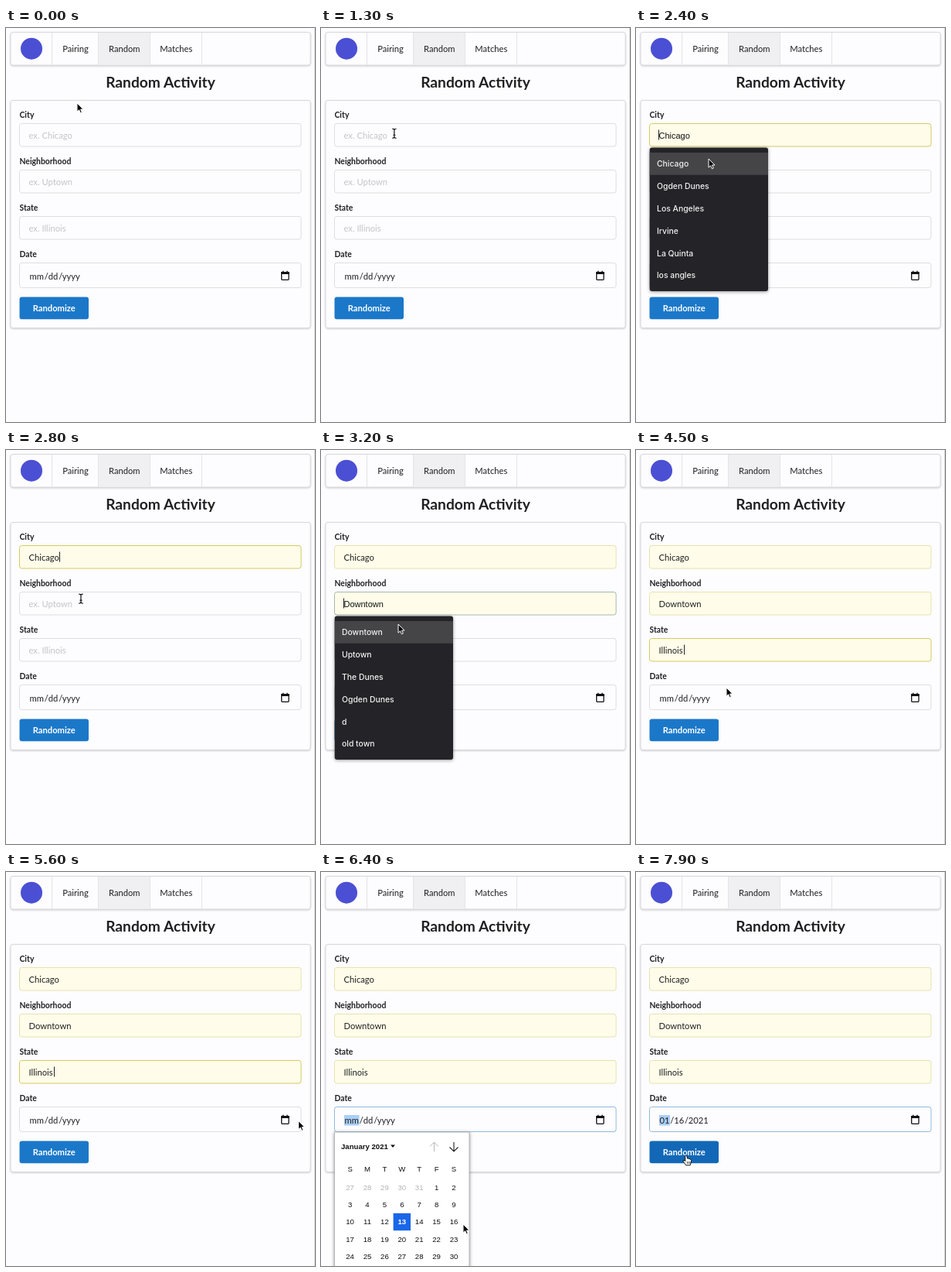
These frames come from a looping animation (400 by 509 pixels, 8 s). An HTML page:

```html
<!DOCTYPE html>
<html lang="en">
<head>
<meta charset="utf-8">
<title>Random Activity</title>
<style>
  html, body { margin: 0; width: 100%; height: 100%; overflow: hidden; background: #fdfcfe; }
  svg { display: block; font: 11.2px Lato, sans-serif; }
  text { fill: #202021; white-space: pre; }
  .title { font-size: 19.2px; font-weight: 700; }
  .label { font-size: 10.4px; font-weight: 700; }
  .button { font-weight: 700; fill: #fff; }
  .preview { font: 11px "Liberation Sans", Arial, sans-serif; fill: #111; }
  .option { font: 500 10.4px Inter, sans-serif; fill: #f1f1f2; }
  .day { font: 9.6px "Liberation Sans", Arial, sans-serif; fill: #111; }
  .bold { font-weight: 700; }
  .panel { fill: #fdfcfe; stroke: #d8d7da; filter: drop-shadow(0 1px 1px #2223); }
  .popup { filter: drop-shadow(0 1px 2px #0006); }
</style>
</head>
<body>
<svg id="stage" width="400" height="509" viewBox="0 0 400 509"></svg>
<script>
const LOOP = 8000;
const FIELDS = [
  { label: 'City', hint: 'ex. Chicago', value: 'Chicago', y: 123, caretEnd: 69.5,
    open: 1900, hover: 2150, pick: 2600, blur: 3000,
    options: ['Chicago', 'Ogden Dunes', 'Los Angeles', 'Irvine', 'La Quinta', 'los angles'] },
  { label: 'Neighborhood', hint: 'ex. Uptown', value: 'Downtown', y: 183, caretEnd: 84.5,
    open: 2950, hover: 3100, pick: 3500, blur: 4050,
    options: ['Downtown', 'Uptown', 'The Dunes', 'Ogden Dunes', 'd', 'old town'] },
  { label: 'State', hint: 'ex. Illinois', value: 'Illinois', y: 243, caretEnd: 62.5,
    open: 3850, hover: 4150, pick: 4400, blur: 5750,
    options: ['Illinois', 'California', 'Indiana', 'IN', 'CA', 'New York'] },
];
const DATE = { open: 5750, pick: 6750, close: 6900 };

// Pointer path: time, x, y
const PATH = [
  [0, 92, 97], [600, 92, 97], [1400, 95, 138], [1800, 95, 139], [2300, 94, 169], [2600, 94, 169],
  [2900, 98, 200], [3080, 100, 224], [3200, 100, 225], [3500, 100, 228], [3800, 107, 259],
  [4000, 108, 260], [4150, 110, 284], [4350, 112, 294], [4500, 117, 307], [5000, 122, 317],
  [5200, 122, 317], [5550, 385, 322], [5700, 361, 320], [6000, 361, 320], [6400, 184, 455],
  [6650, 173, 451], [6950, 173, 451], [7700, 67, 368], [7900, 65, 368], [8000, 65, 368],
];

const text = (x, y, s, cls = '', extra = '') => `<text x="${x}" y="${y}" class="${cls}" ${extra}>${s}</text>`;
const centered = (x, y, s, cls, extra = '') => text(x, y, s, cls, `text-anchor="middle" ${extra}`);
const rect = (x, y, w, h, fill, extra = '') =>
  `<rect x="${x}" y="${y}" width="${w}" height="${h}" fill="${fill}" ${extra}/>`;
const path = (d, extra) => `<path d="${d}" ${extra}/>`;
const input = (y, h, fill, stroke) => rect(17.5, y + .5, 364.5, h, fill, `rx="3" stroke="${stroke}"`);

function pointerAt(t) {
  const i = PATH.findIndex(key => key[0] > t);
  const [t0, x0, y0] = PATH[i - 1], [t1, x1, y1] = PATH[i];
  const u = (t - t0) / (t1 - t0), e = u * u * (3 - 2 * u);
  return { x: x0 + (x1 - x0) * e, y: y0 + (y1 - y0) * e };
}

const header = [
  rect(6, 5.5, 388, 42.5, '', 'rx="3" class="panel"'),
  rect(120, 6, 66.5, 41.5, '#f0eff1'),
  path('M59.5 6V48M119.5 6V48M186.5 6V48M253.5 6V48', 'stroke="#e4e3e6"'),
  '<circle cx="33" cy="26.7" r="14" fill="#4b4fd3"/>',
  centered(90, 31, 'Pairing'), centered(153.3, 31, 'Random'), centered(220.3, 31, 'Matches'),
  centered(200, 76.5, 'Random Activity', 'title'),
  rect(6, 93.5, 388, 294, '', 'rx="3" class="panel"'),
  rect(399, 0, 1, 509, '#d0cfd2'),
].join('');

function drawField(f, t) {
  const focused = t >= f.open && t < f.blur;
  const filled = t >= f.hover, picked = t >= f.pick;
  let border = filled ? '#e6e2b0' : '#dedde0';
  if (focused && filled) border = t < f.hover + 200 ? '#a2b8ad' : '#d5c965';
  else if (focused) border = t < f.open + 200 ? '#b9c3cc' : '#85b7d9';
  const y = f.y + 19.5;
  const content = picked ? text(29.5, y, f.value)
    : filled ? text(29.5, y, f.value, 'preview')
    : text(29.5, y, f.hint, '', `style="fill:${focused ? '#858487' : '#c5c4c7'}"`);
  const caretOn = focused && (!picked || (t - f.pick) % 1000 < 500);
  return text(17.5, f.y - 7, f.label, 'label') + input(f.y, 29.5, filled ? '#fffde9' : '#fdfcfe', border)
    + content + (caretOn ? rect(picked ? f.caretEnd - .5 : 29, f.y + 8.5, 1, 13, '#222') : '');
}

function drawDate(t) {
  const focused = t >= DATE.open, picked = t >= DATE.pick;
  const parts = picked ? ['01', '/', '16', '/', '2021'] : ['mm', '/', 'dd', '/', 'yyyy'];
  const xs = picked ? [30.5, 44.3, 49.3, 63, 67.8] : [30.5, 49.8, 54.8, 68.2, 72.8];
  return text(17.5, 296, 'Date', 'label') + input(303, 32, '#fdfcfe', focused ? '#8fbbdc' : '#dedde0')
    + (focused ? rect(30, 314, picked ? 14 : 19.5, 13.5, '#a9cff8') : '')
    + parts.map((s, i) => text(xs[i], 325, s)).join('')
    + rect(356.7, 315.7, 9.3, 9.6, 'none', 'rx=".8" stroke="#111" stroke-width="1.3"')
    + path('M356 315h10.6v3H356ZM358 313.7h1.4v2H358ZM363.3 313.7h1.4v2h-1.4Z', 'fill="#111"');
}

function drawOptions(f, t) {
  const top = f.y + 31.5, row = 28.8;
  return `<g class="popup">${rect(17.7, top, 153.3, 185.5, '#242327', 'rx="3"')}</g>`
    + (t >= f.hover ? rect(17.7, top + 6.5, 153.3, row, '#454447') : '')
    + f.options.map((s, i) => text(27, top + 24.8 + i * row, s, 'option')).join('');
}

function drawPicker(t) {
  const selected = t >= DATE.pick ? 16 : 13;
  const column = i => 37.6 + i % 7 * 22.4;
  let out = `<g class="popup">${rect(17.5, 336, 174.5, 190, '#fff', 'stroke="#b5b5b8"')}</g>`
    + text(26, 358, 'January 2021', 'day bold') + path('M90 352.5h6l-3 3.5Z', 'fill="#111"')
    + path('M146.5 361V349M141 354.5l5.5-5.5 5.5 5.5', 'fill="none" stroke="#b5b5b8"')
    + path('M172 349v12M166.5 355.5l5.5 5.5 5.5-5.5', 'fill="none" stroke="#222" stroke-width="1.1"');
  [...'SMTWTFS'].forEach((s, i) => { out += centered(column(i), 387.3, s, 'day'); });
  for (let i = 0; i < 35; i++) {
    const day = i < 5 ? 27 + i : i - 4, y = 410.6 + Math.floor(i / 7) * 22.4;
    const active = i >= 5 && day === selected;
    if (active) out += rect(column(i) - 11.2, y - 14.6, 22.4, 22.4, '#1967e8');
    const color = active ? '#fff' : i < 5 ? '#b2b2b5' : '#111';
    out += centered(column(i), y, day, active ? 'day bold' : 'day', `style="fill:${color}"`);
  }
  return out;
}

function drawPointer({ x, y }, popupTop, onButton) {
  const overField = FIELDS.some(f => y > f.y && y < f.y + 30) && y < popupTop;
  const shape = onButton
    ? path('M-1.3-1.5Q-.2-2.6.8-1.2L1.6 2.2Q3 1.4 3.6 2.7 5 2.2 5.4 3.4 6.8 3.2 6.8 4.8L6 8.2 5.2 10.8H-.3Q-2-8.2-3.7 6.2-4.7 4.3-3 4.3L-1.2 5.6Z'
        .replace('Q-2-8.2', 'Q-2 8.2'), 'fill="#fff" stroke="#111" stroke-linejoin="round"')
      + path('M1.4 6v3M3.2 6v3M5 6v3', 'stroke="#111" stroke-width=".7"')
    : overField
    ? path('M-2.7-6Q0-6 0-4.5Q0-6 2.7-6M0-4.5V4.5M-2.7 6Q0 6 0 4.5Q0 6 2.7 6M-1.5 2H1.5', 'fill="none" stroke="#111" stroke-width="1.2"')
    : path('M0 0V11.2L2.6 8.8 4.4 12.8 6.3 12 4.6 8.1H8Z', 'fill="#080808" stroke="#fff" stroke-width="1" stroke-linejoin="round"');
  return `<g transform="translate(${x.toFixed(2)} ${y.toFixed(2)})">${shape}</g>`;
}

function scene(t) {
  const pointer = pointerAt(t);
  const openField = FIELDS.find(f => t >= f.open && t < f.pick);
  const pickerOpen = t >= DATE.open && t < DATE.close;
  const popupTop = openField ? openField.y + 31 : pickerOpen ? 336 : 509;
  const { x, y } = pointer;
  const onButton = x > 17 && x < 107 && y > 347 && y < 376 && y < popupTop;
  return header
    + FIELDS.map(f => drawField(f, t)).join('') + drawDate(t)
    + rect(17.5, 347.5, 89.5, 28.7, onButton ? '#1268b7' : '#1b78c9', 'rx="3"')
    + centered(62.3, 365.7, 'Randomize', 'button')
    + (openField ? drawOptions(openField, t) : '')
    + (pickerOpen ? drawPicker(t) : '')
    + drawPointer(pointer, popupTop, onButton);
}

const stage = document.getElementById('stage');
const start = performance.now();
let shown = '';
function frame() {
  const next = scene((performance.now() - start) % LOOP);
  if (next !== shown) stage.innerHTML = shown = next;
  requestAnimationFrame(frame);
}
frame();
</script>
</body>
</html>
```
